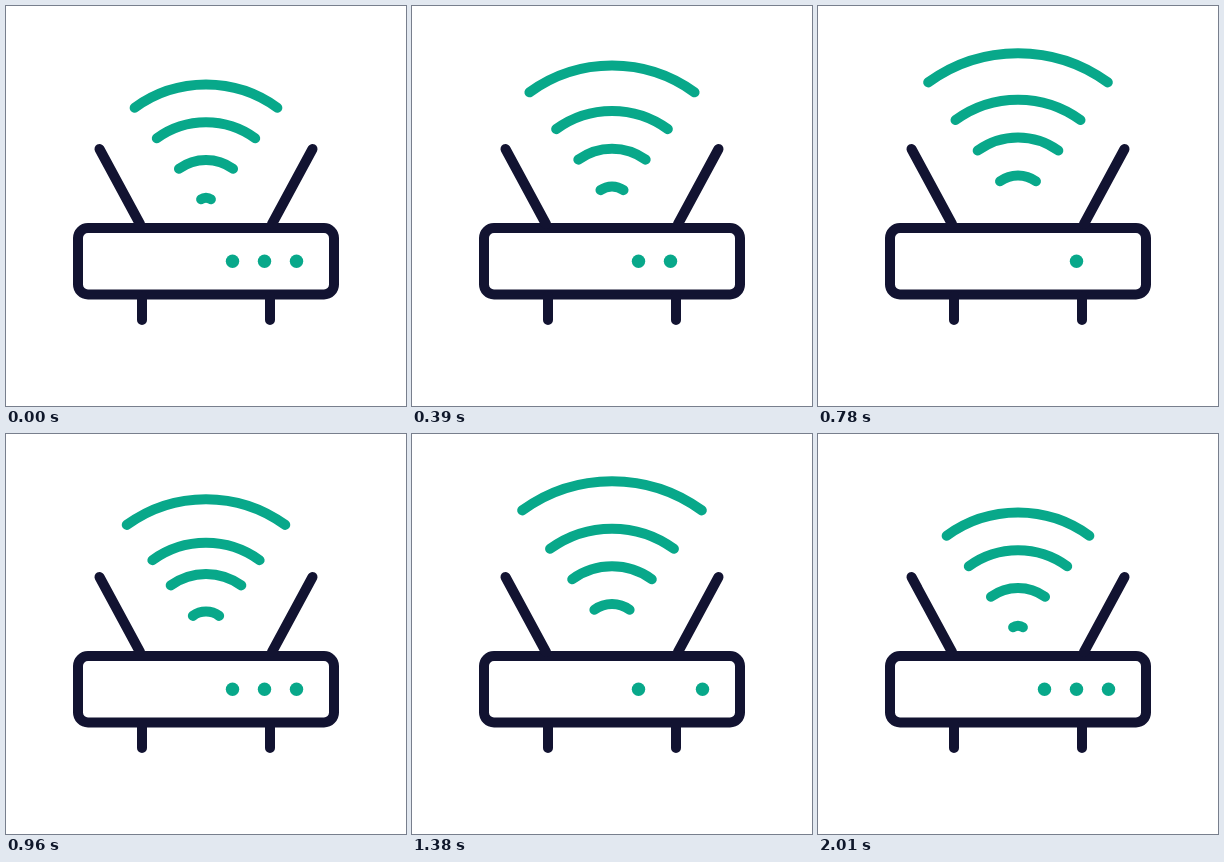
An HTML page that plays this animation: 400x400 px, repeating every 4.43 s.

```html
<!DOCTYPE html>
<html lang="en">
<head>
<meta charset="utf-8">
<title>Router</title>
<style>
  html, body { margin: 0; width: 100%; height: 100%; overflow: hidden; background: #fff; }
  svg { display: block; width: 100%; height: 100%; }
  .body, #waves { fill: none; stroke-width: 10; stroke-linecap: round; stroke-linejoin: round; }
  .body { stroke: #121331; }
  #waves { stroke: #08a88a; }
  #lights { fill: #08a88a; }
</style>
</head>
<body>
<svg viewBox="0 0 400 400">
  <g id="waves"></g>
  <g class="body">
    <rect x="72" y="222" width="256" height="66.500" rx="10"/>
    <path d="M93.5 143 L134 218 M306.5 143 L266 218 M136 290 V314 M264 290 V314"/>
  </g>
  <g id="lights">
    <circle cx="226.500" cy="255.200" r="6.700"/>
    <circle cx="258.500" cy="255.200" r="6.700"/>
    <circle cx="290.500" cy="255.200" r="6.700"/>
  </g>
</svg>
<script>
const LOOP = 4430, ACTIVE = 2010, STEP = 30;
const FIRST_RADIUS = 8.3, GAP = 37.7, EXIT_GAP = 37.4, HALF_ANGLE = Math.PI / 5;
const SLOT_TIME = 300, SETTLE_END = 1880;
const BLINK_PERIOD = 900;
// Off intervals of each light within one blink period
const OFF = [[[765, 900]], [[450, 765]], [[150, 420], [765, 900]]];

const lights = [...document.querySelectorAll('#lights circle')];
const waves = Array.from({ length: 9 }, () => {
  const path = document.createElementNS('http://www.w3.org/2000/svg', 'path');
  return document.getElementById('waves').appendChild(path);
});

// Position of a wave in slots: 0 to 3 are the resting slots, 4 is the exit.
// The first five waves flow out steadily, the last four slow down into rest.
function wavePosition(index, t) {
  if (index < 5) return 3 - index + t / SLOT_TIME;
  const left = Math.max(0, SETTLE_END - t) / 1100;
  return 8 - index - 2.41 * left ** 2.2;
}

function drawWave(path, position) {
  let radius = FIRST_RADIUS + GAP * position;
  let width = 10;
  if (position > 3) {
    const exit = position - 3;
    radius = FIRST_RADIUS + GAP * 3 + EXIT_GAP * (1 - (1 - exit) ** 2);
    width -= 4 * Math.max(0, exit - 0.6);
  }
  const visible = radius > 3 && position < 4;
  path.style.display = visible ? '' : 'none';
  if (!visible) return;
  const dx = radius * Math.sin(HALF_ANGLE);
  const y = 200 - radius * Math.cos(HALF_ANGLE);
  path.setAttribute('d', `M${200 - dx} ${y} A${radius} ${radius} 0 0 1 ${200 + dx} ${y}`);
  path.style.strokeWidth = width;
}

function render(time) {
  const t = Math.min(ACTIVE, Math.floor((time % LOOP) / STEP) * STEP);
  waves.forEach((path, i) => drawWave(path, wavePosition(i, t)));
  const phase = t % BLINK_PERIOD;
  lights.forEach((light, i) => {
    const off = OFF[i].some(([from, to]) => phase >= from && phase < to);
    light.style.display = off && t < ACTIVE ? 'none' : '';
  });
}

const start = performance.now();
function tick() {
  render(performance.now() - start);
  requestAnimationFrame(tick);
}
tick();
</script>
</body>
</html>
```
